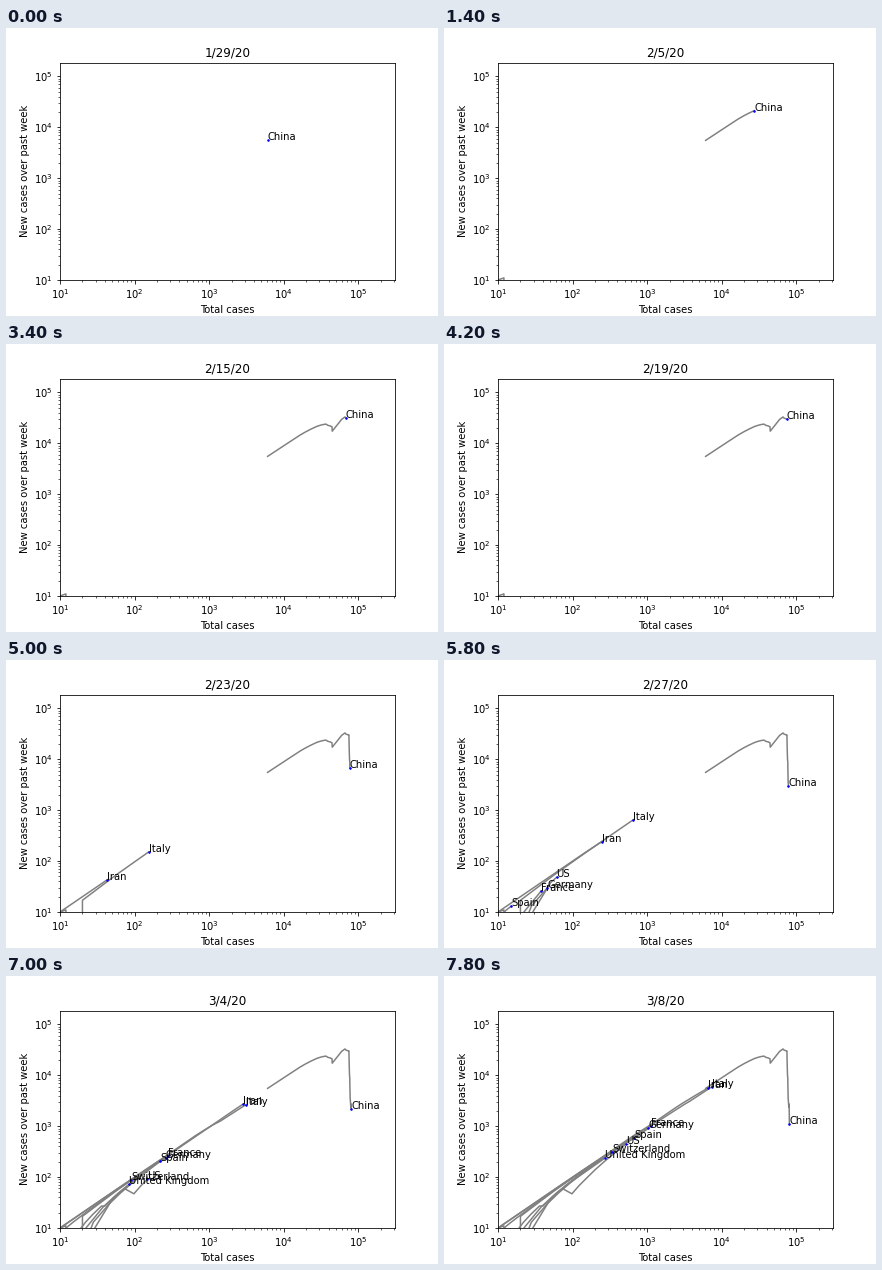
A matplotlib script for the animation above (8000 ms loop, 432 by 288 pixels).

```python
import numpy as np
import matplotlib.pyplot as plt
from matplotlib.animation import FuncAnimation

WEEK = 7
DAYS = np.arange(47)               # 1/22/20 to 3/8/20
FRAMES = len(DAYS) - WEEK
FIRST_DAY = np.datetime64("2020-01-22")

fig = plt.figure(figsize=(6, 4), dpi=72, facecolor="white")
fig.subplots_adjust(left=0.125, right=0.9, bottom=0.125, top=0.88)
ax = fig.add_subplot()
ax.set(xscale="log", yscale="log", xlim=(10, 308850), ylim=(10, 187372),
       xlabel="Total cases", ylabel="New cases over past week")
title = ax.set_title("")
tracks = []


def add_country(name, *points):
    """Exponential growth between (day, total) points, constant before."""
    days, totals = np.transpose(points)
    total = np.round(np.exp(np.interp(DAYS, days, np.log(totals))))
    new = total[WEEK:] - total[:-WEEK]
    line, = ax.plot([], [], color="gray", lw=1.5)
    dot, = ax.plot([], [], "o", color="blue", ms=1.5, zorder=2.2)
    label = ax.annotate(name, (10, 10))
    tracks.append((total[WEEK:], new, line, dot, label))


# A total of 0.1 rounds to no cases yet.
add_country("China", (0, 548), (5, 2877), (7, 6087), (11, 16630),
            (14, 27440), (17, 36814), (20, 44386), (21, 44759), (22, 59895),
            (23, 66358), (27, 74211), (31, 77001), (32, 77022), (40, 80136),
            (46, 80823))
add_country("Italy", (29, 3), (30, 20), (32, 155), (36, 655), (42, 3089),
            (46, 7375))
add_country("Iran", (28, 0.1), (29, 5), (30, 18), (32, 43), (35, 139),
            (36, 245), (41, 2336), (46, 6566))
add_country("Germany", (4, 0.1), (6, 4), (11, 10), (12, 12), (34, 17),
            (36, 46), (39, 130), (42, 262), (43, 482), (46, 1040))
add_country("France", (34, 12), (36, 38), (38, 100), (42, 285), (44, 653),
            (46, 1126))
add_country("Spain", (33, 2), (35, 13), (36, 15), (39, 84), (42, 222),
            (46, 673))
add_country("US", (29, 13), (32, 15), (33, 51), (39, 74), (40, 98),
            (42, 149), (46, 518))
add_country("United Kingdom", (32, 9), (33, 13), (35, 13), (39, 36),
            (40, 40), (42, 85), (46, 273))
add_country("Switzerland", (33, 0.1), (37, 8), (38, 18), (42, 90), (46, 337))


def update(i):
    year, month, day = str(FIRST_DAY + WEEK + i).split("-")
    title.set_text(f"{int(month)}/{int(day)}/{year[2:]}")
    for total, new, line, dot, label in tracks:
        here = total[i], new[i]
        line.set_data(total[:i + 1], new[:i + 1])
        dot.set_data([here[0]], [here[1]])
        label.xy = here
        label.set_position(here)
        label.set_visible(min(here) >= 10)
    return []


anim = FuncAnimation(fig, update, frames=FRAMES, interval=200,
                     init_func=lambda: update(0), repeat=True,
                     repeat_delay=0)
plt.show()
```
